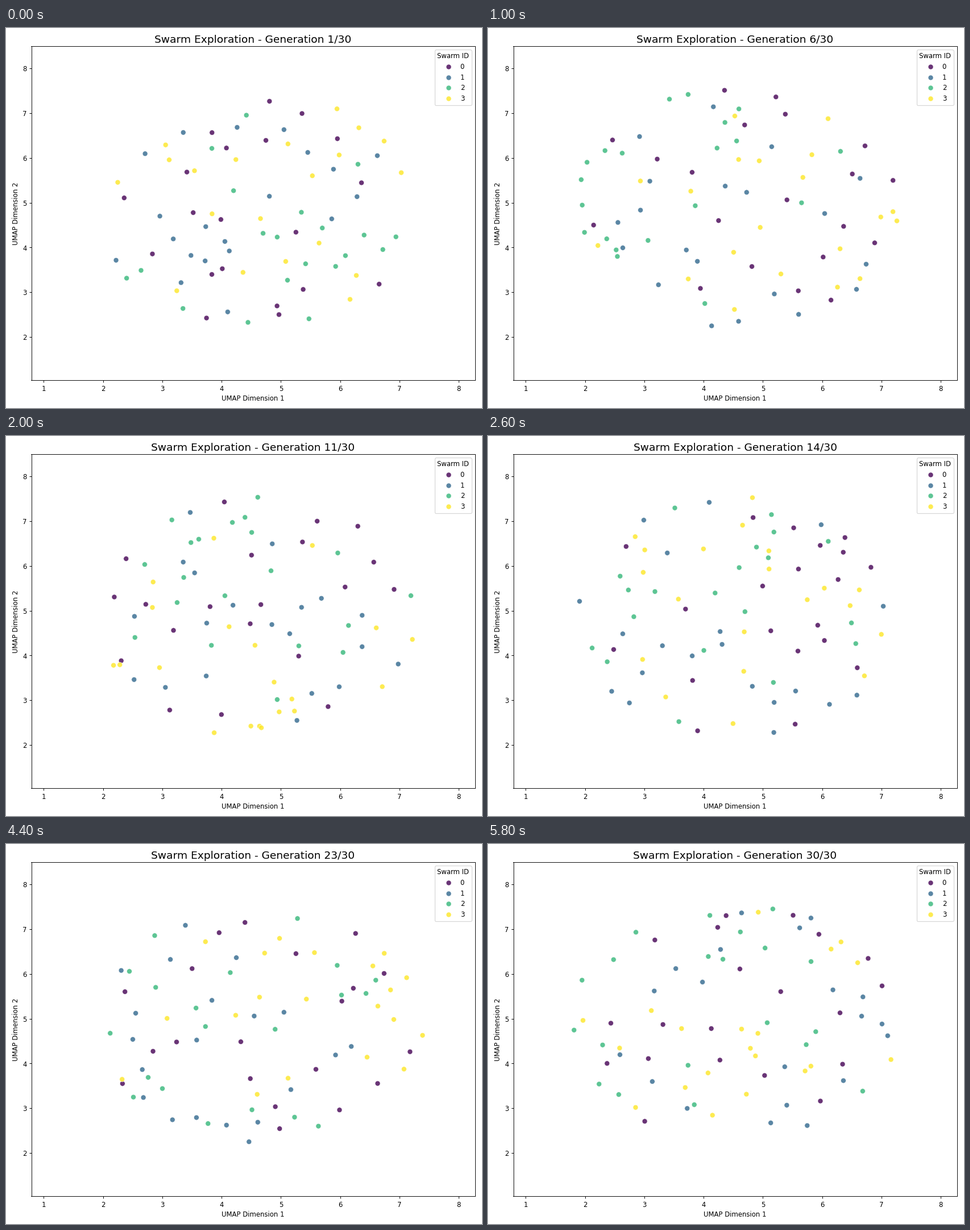
A matplotlib script for the animation above (6000 ms loop, 837 by 669 pixels).

```python
import numpy as np
import matplotlib.pyplot as plt
from matplotlib.animation import FuncAnimation
from matplotlib.lines import Line2D

np.random.seed(42)
rng = np.random.default_rng(42)

W, H, DPI = 837, 669, 83.7
GENS, PER_SWARM, SIZE = 30, 20, 60
EDGE = 0.08 * np.sqrt(SIZE)
COLORS = plt.get_cmap("viridis")(np.linspace(0, 1, 4))

# The cloud is an ellipse; each swarm's mean drifts inside it.
CENTER, RADII = np.array([4.58, 4.85]), np.array([2.7, 2.7])
KEY_GENS = [1, 6, 9, 14, 18, 23, 30]
MEAN_X = [
    [4.50, 4.80, 5.05, 4.95, 4.75, 4.90, 5.10],
    [4.52, 4.85, 4.55, 4.50, 4.65, 4.50, 5.10],
    [4.62, 3.90, 4.55, 4.20, 4.20, 4.05, 3.70],
    [4.93, 5.00, 4.55, 4.50, 5.20, 5.50, 5.00],
]
MEAN_Y = [
    [4.64, 5.20, 4.85, 5.10, 5.30, 5.30, 5.20],
    [4.89, 4.90, 4.60, 4.60, 4.90, 4.40, 5.20],
    [4.42, 5.40, 5.20, 5.10, 5.20, 4.85, 5.10],
    [4.95, 4.75, 4.25, 4.95, 4.20, 4.85, 5.00],
]


def drift(swarm, gen):
    mean = [np.interp(gen, KEY_GENS, m[swarm]) for m in (MEAN_X, MEAN_Y)]
    return (np.array(mean) - CENTER) / RADII


def disc_point(shift):
    """Random point in the unit disc, pulled towards the swarm's mean."""
    r, a = np.sqrt(rng.random()), rng.uniform(0, 2 * np.pi)
    p = r * np.array([np.cos(a), np.sin(a)])
    return p + 2 * shift * (1 - r * r)


def positions(gen):
    """Scatter of one generation; the roomier of two candidates is kept."""
    pts = []
    for i in range(4 * PER_SWARM):
        shift = drift(i // PER_SWARM, gen)
        pair = [disc_point(shift) for _ in range(2)]
        if pts:
            pair.sort(key=lambda p: np.hypot(*(np.array(pts) - p).T).min())
        pts.append(pair[-1])
    return CENTER + RADII * np.array(pts)


clouds = [positions(g) for g in range(1, GENS + 1)]

fig = plt.figure(figsize=(10, 7.993), dpi=DPI)
ax = fig.add_axes([44.5 / W, 48.5 / H, 780 / W, 588 / H])
ax.set(xlim=(0.789, 8.2735), ylim=(1.0286, 8.495),
       xlabel="UMAP Dimension 1", ylabel="UMAP Dimension 2")
ax.set_xticks(range(1, 9))
ax.set_yticks(range(2, 9))
title = ax.set_title("", fontsize=16)

dots = ax.scatter(*clouds[0].T, s=SIZE, c=np.repeat(COLORS, PER_SWARM, axis=0),
                  alpha=0.8, edgecolors="white", linewidths=EDGE)
handles = [
    Line2D([], [], ls="", marker="o", ms=np.sqrt(SIZE), color=c, alpha=0.8,
           mec="white", mew=EDGE, label=str(i))
    for i, c in enumerate(COLORS)
]
ax.legend(handles=handles, title="Swarm ID", loc="upper right")


def update(i):
    title.set_text(f"Swarm Exploration - Generation {i + 1}/{GENS}")
    dots.set_offsets(clouds[i])
    return title, dots


anim = FuncAnimation(fig, update, frames=GENS, interval=200,
                     repeat=True, repeat_delay=0)
plt.show()
```
